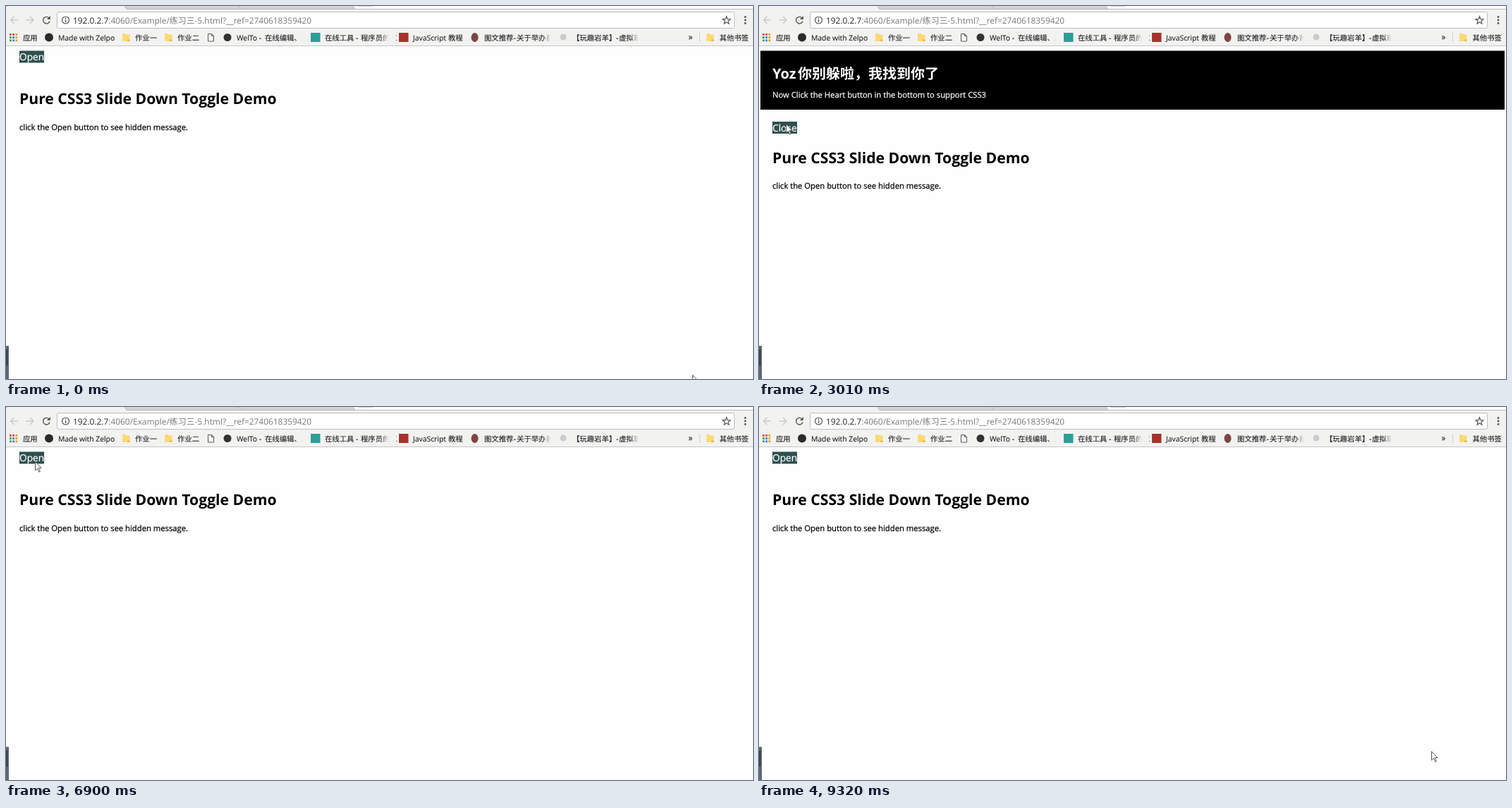
An HTML page that plays this animation: 1059 px wide and 529 px high, repeating every 9420 ms.

```html
<!DOCTYPE html>
<html lang="zh-CN">
<head>
<meta charset="utf-8">
<title>Slide down toggle</title>
<style>
  html, body { margin: 0; width: 100%; height: 100%; overflow: hidden; background: #fefefe; }
  svg { display: block; width: 100vw; height: 100vh; }
  text {
    font-family: "Open Sans", "Noto Sans CJK SC", "Noto Sans CJK", "Noto Sans CJK JP", sans-serif;
    white-space: pre; text-rendering: geometricPrecision;
  }
  .marks text { font-size: 10.35px; fill: #222; stroke: #222; stroke-width: .12; }
  .line { fill: none; stroke: #555; stroke-width: 1.4; }
  .off { stroke: #c9c9c9; }
  .button { font-size: 13.7px; fill: #fff; stroke: #fff; stroke-width: .2; }
  .title { font-size: 21.15px; font-weight: 700; }
  .note { font-size: 11.25px; stroke: #000; stroke-width: .25; }
  #panel .note { stroke: #fff; }
  #beam { mix-blend-mode: difference; fill: none; stroke: #fff; stroke-width: 1.2; }
</style>
</head>
<body>
<svg viewBox="0 0 1059 529">
  <defs>
    <linearGradient id="fade">
      <stop offset="0" stop-color="#f2f2f1" stop-opacity="0"/>
      <stop offset="1" stop-color="#f2f2f1"/>
    </linearGradient>
    <g id="folder">
      <path d="M0 .5H4.5L5.5 2H10.500V11.500H0Z" fill="#fbd975"/>
      <path d="M7 11.500V9H10.500V11.500Z" fill="#e9b94e"/>
    </g>
  </defs>
  <rect width="1059" height="529" fill="#fefefe"/>

  <!-- tab strip and toolbar -->
  <rect y="4" width="1059" height="52" fill="#f2f2f1"/>
  <path d="M0 0H168L171 5H0Z" fill="#f2f2f1"/>
  <path d="M168 0H492L495 5H171Z" fill="#d3d3d2"/>
  <path d="M498 0H519L521 1H499Z" fill="#d3d3d2"/>
  <path d="M0 .5H2M168 0L171 4.500H1059M330 0L333 4.500M492 0L495 4.500" fill="none" stroke="#b9b9b9"/>
  <path d="M0 56.500H1059" stroke="#c6c6c6"/>
  <path class="line off" d="M17 20H6.500M11.500 15L6.500 20L11.500 25"/>
  <path class="line off" d="M28.500 20H39M34 15L39 20L34 25"/>
  <path class="line" d="M61 17A4.800 4.800 0 1 0 62 21.500"/>
  <path d="M62.800 14V19H57.800Z" fill="#555"/>
  <rect x="72.500" y="8.500" width="960" height="23" rx="2" fill="#fff" stroke="#bdbdbd"/>
  <circle class="line" cx="84.500" cy="20" r="5" style="stroke-width:1.200"/>
  <path class="line" d="M84.500 19V23M84.500 16.500V18"/>
  <text x="95" y="24.500" font-size="11.9" fill="#222">192.0.2.7<tspan fill="#777">:4060/Example/练习三-5.html?__ref=2740618359420</tspan></text>
  <path id="star" class="line" style="stroke-width:1.200"/>
  <g fill="#555"><circle cx="1048" cy="15.500" r="1.400"/><circle cx="1048" cy="20" r="1.400"/><circle cx="1048" cy="24.500" r="1.400"/></g>

  <!-- bookmarks -->
  <g class="marks">
    <g id="apps"></g>
    <text x="24" y="48.500">应用</text>
    <circle cx="61" cy="44.500" r="6" fill="#2b2b2b"/>
    <text x="74" y="48.500">Made with Zelpo</text>
    <use href="#folder" x="165" y="38.500"/>
    <text x="183" y="48.500">作业一</text>
    <use href="#folder" x="225" y="38.500"/>
    <text x="243" y="48.500">作业二</text>
    <path d="M286.500 39.500H291.500L294.500 42.500V50H286.500ZM291.500 39.500V42.500H294.500" fill="#fff" stroke="#555"/>
    <circle cx="314" cy="44.500" r="5.500" fill="#333"/>
    <text x="327" y="48.500">WelTo - <tspan x="367">在线编辑、后</tspan></text>
    <rect x="432" y="38" width="13.500" height="13" fill="#2b9f98"/>
    <text x="452" y="48.500">在线工具 - <tspan x="503">程序员的工</tspan></text>
    <rect x="557" y="38" width="13.500" height="13" fill="#a8322b"/>
    <text x="577" y="48.500">JavaScript <tspan x="627">教程</tspan></text>
    <ellipse cx="664.500" cy="44.500" rx="5" ry="6.500" fill="#7c4541"/>
    <text x="678" y="48.500">图文推荐-<tspan x="724">关于举办首</tspan></text>
    <circle cx="790" cy="44" r="4.500" fill="#cbcbcb"/>
    <text x="803" y="48.500">【玩趣岩羊】-<tspan x="869">虚拟现</tspan></text>
    <g id="fades"></g>
    <text x="967.500" y="48" style="font-size:12px">»</text>
    <path d="M983.500 38V51" stroke="#d0d0d0"/>
    <use href="#folder" x="993" y="38.500"/>
    <text x="1011.500" y="48.500">其他书签</text>
  </g>

  <!-- page -->
  <g id="panel" fill="#fff">
    <rect x="2" y="63.500" width="1055" height="83.500" fill="#000"/>
    <text x="19" y="102.500" font-size="20" font-weight="700">Yoz<tspan x="55">你别躲啦，我找到你了</tspan></text>
    <text class="note" x="19" y="129.500">Now Click the Heart button in the bottom to support CSS3</text>
  </g>
  <g id="button">
    <rect x="19" y="63.500" width="35" height="17" fill="#2f4f4f"/>
    <text id="label" class="button" x="19" y="77.300"></text>
  </g>
  <g id="content">
    <text class="title" x="19" y="139">Pure CSS3 Slide Down Toggle Demo</text>
    <text class="note" x="19" y="175.700">click the Open button to see hidden message.</text>
  </g>
  <rect y="482" width="4" height="47" fill="#5a6873"/>
  <rect y="487" width="2.500" height="23" fill="#39434c"/>

  <path id="arrow" d="M.5 .5V13L3.400 10.200L5.600 15.200L7.400 14.400L5.200 9.500H9Z" fill="#fff" stroke="#444" stroke-width=".9"/>
  <path id="beam" d="M-4-7H-1.200L0-6L1.200-7H4M0-6V6M-4 7H-1.200L0 6L1.200 7H4"/>
</svg>
<script>
const LOOP = 9420;
const $ = id => document.getElementById(id);

// first step, last step, number of steps, waypoints
const moves = [
  [70, 990, 13, [[973, 523], [560, 330], [103, 174]]],
  [1050, 1600, 8, [[103, 174], [60, 105], [36, 69]]],
  [2180, 2840, 10, [[36, 69], [38, 120], [40, 165]]],
  [3010, 3010, 1, [[40, 165], [38, 167]]],
  [3470, 3620, 3, [[38, 167], [39, 161]]],
  [3850, 4720, 12, [[39, 161], [100, 133], [74, 147]]],
  [4800, 5420, 9, [[74, 147], [41, 171]]],
  [6280, 6900, 9, [[41, 171], [40, 125], [41, 77]]],
  [7300, 7300, 1, [[41, 77], [43, 87]]],
  [7380, 8150, 11, [[43, 87], [41, 130], [39, 180]]],
  [8460, 8460, 1, [[39, 180], [39, 181]]],
  [8630, 9320, 10, [[39, 181], [500, 340], [953, 488]]]
];

const ease = k => k * k * (3 - 2 * k);

function along(points, k) {
  const pos = k * (points.length - 1);
  const i = Math.min(Math.floor(pos), points.length - 2);
  return [0, 1].map(a => points[i][a] + (points[i + 1][a] - points[i][a]) * (pos - i));
}

function pointer(t) {
  let at = moves[0][3][0];
  for (const [start, end, steps, points] of moves) {
    if (t < start) break;
    const gap = (end - start) / (steps - 1) || 1;
    const step = Math.min(steps, Math.floor((t - start) / gap + 0.01) + 1);
    at = along(points, ease(step / steps));
  }
  return at.map(Math.round);
}

// right edge, top and bottom of each selectable line
function overText(x, y, open) {
  const shift = open ? 83 : 0;
  const lines = [[383, 118 + shift, 146 + shift], [257, 164 + shift, 180 + shift]];
  if (open) lines.push([255, 82, 107], [324, 118, 134]);
  return lines.some(([right, top, bottom]) => x >= 19 && x <= right && y >= top && y <= bottom);
}

function draw(t) {
  const open = (t >= 1910 && t < 5960) || (t >= 7300 && t < 8460);
  $("panel").style.display = open ? "" : "none";
  $("button").setAttribute("transform", `translate(0 ${open ? 100.5 : 0})`);
  $("content").setAttribute("transform", `translate(0 ${open ? 83.5 : 0})`);
  $("label").textContent = open ? "Close" : "Open";

  const [x, y] = pointer(t);
  const text = overText(x, y, open);
  for (const id of ["arrow", "beam"]) {
    $(id).setAttribute("transform", `translate(${x} ${y})`);
    $(id).style.display = (id === "beam") === text ? "" : "none";
  }
}

function addRect(parent, x, y, width, height, fill) {
  const rect = document.createElementNS("http://www.w3.org/2000/svg", "rect");
  Object.entries({ x, y, width, height, fill }).forEach(([k, v]) => rect.setAttribute(k, v));
  parent.append(rect);
}

const dots = ["#d9503f", "#d9503f", "#e0a030", "#4a9a55", "#4a7fd0", "#e0a030", "#4a9a55", "#4a7fd0", "#e0a030"];
dots.forEach((fill, i) => addRect($("apps"), 5 + i % 3 * 4.2, 39 + Math.floor(i / 3) * 4.2, 2.8, 2.8, fill));

for (const right of [421, 543, 772, 897]) {
  addRect($("fades"), right - 12, 37, 12, 16, "url(#fade)");
  addRect($("fades"), right, 37, 10, 16, "#f2f2f1");
}

const corners = Array.from({ length: 10 }, (_, i) => {
  const r = i % 2 ? 2.4 : 5.8, a = i * Math.PI / 5;
  return `${1021.5 + r * Math.sin(a)} ${20.5 - r * Math.cos(a)}`;
});
$("star").setAttribute("d", `M${corners.join("L")}Z`);

const began = performance.now();
function tick() {
  draw((performance.now() - began) % LOOP);
  requestAnimationFrame(tick);
}
tick();
</script>
</body>
</html>
```
